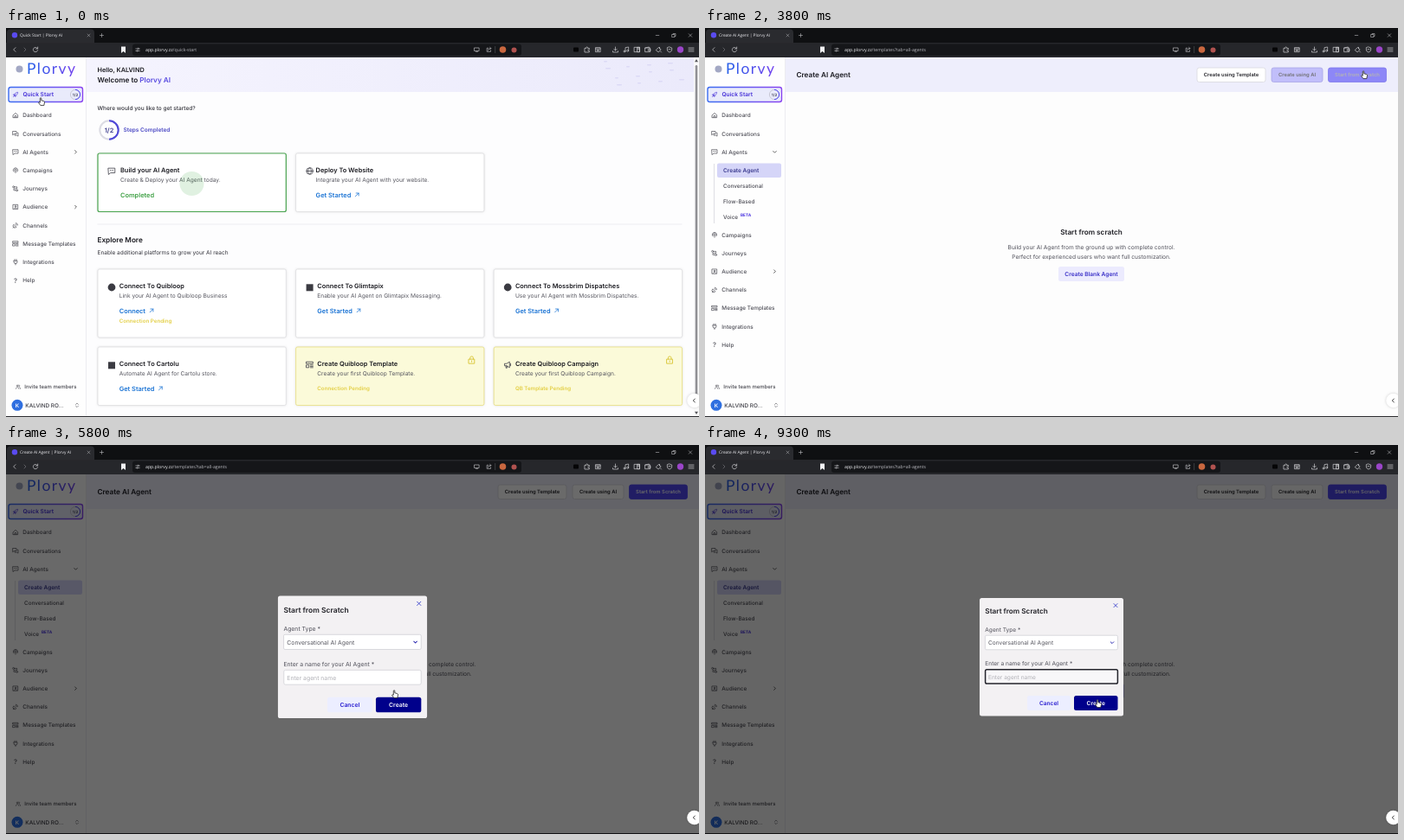
These frames come from a looping animation (800 px wide and 450 px high, 9400 ms). An HTML page with a canvas:

```html
<!DOCTYPE html>
<html lang="en">
<head>
<meta charset="utf-8">
<title>Plorvy AI</title>
<style>
html, body { margin: 0; width: 100%; height: 100%; overflow: hidden; background: #fff; }
canvas { display: block; width: 800px; height: 450px; }
</style>
</head>
<body>
<canvas id="stage" width="800" height="450"></canvas>
<script>
const ctx = document.getElementById('stage').getContext('2d');
const LOOP = 9400, STEP = 100;
const OPEN_MENU = 1300, OPEN_PAGE = 2300, PICK_SCRATCH = 3735, OPEN_MODAL = 5577, FOCUS = 6450;
const INK = '#1c1c22', GREY = '#50505a', BLUE = '#1a73d4', ACCENT = '#4f46f2', NAVY = '#00008b';

const ICONS = {
  rocket: 'M4 20l4-4M9 15c0-7 5-11 11-11 0 6-4 11-11 11zM9 15l-5-2 4-4M9 15l2 5 4-4',
  home: 'M4 11l8-7 8 7v9H4zM9 20v-6h6v6',
  chats: 'M3 4h12v9H7l-4 3zM18 9h3v12l-4-3H9v-2',
  bot: 'M3 4h18v13H9l-5 4zM8 10h2M14 10h2',
  cast: 'M6 17a8 8 0 1 1 12 0M9 14a4 4 0 1 1 6 0M12 12v9',
  route: 'M8 6a3 3 0 1 1-6 0 3 3 0 1 1 6 0M8 6h9v6H6v6h8M20 18a3 3 0 1 1-6 0 3 3 0 1 1 6 0',
  person: 'M4 4h16v16H4zM8 17c1-4 7-4 8 0M14.5 10a2.5 2.5 0 1 1-5 0 2.5 2.5 0 1 1 5 0',
  dish: 'M5 10a6 6 0 0 0 9 9zM4 21l4-4M13 4a8 8 0 0 1 7 7M12 8a5 5 0 0 1 4 4',
  grid: 'M3 4h18v5H3zM3 13h7v7H3zM14 13h7M14 16.5h7M14 20h7',
  plug: 'M9 3v5M15 3v5M6 8h12v4a6 6 0 0 1-12 0zM12 18v4',
  people: 'M12 8a3 3 0 1 1-6 0 3 3 0 1 1 6 0M3 20c0-8 12-8 12 0M15 5a3 3 0 0 1 0 6M17 14c3 0 4 3 4 6',
  globe: 'M21 12a9 9 0 1 1-18 0 9 9 0 1 1 18 0M3 12h18M12 3c-6 6-6 12 0 18c6-6 6-12 0-18',
  horn: 'M4 9h5l8-5v16l-8-5H4zM7 15v6h3v-5M20 9v6',
  lock: 'M5 10h14v11H5zM8 10V7a4 4 0 0 1 8 0v3M12 14v3',
  right: 'M9 6l6 6-6 6', down: 'M6 9l6 6 6-6', left: 'M15 5l-7 7 7 7',
  sort: 'M7 9l5-5 5 5M7 15l5 5 5-5',
  out: 'M5 19L19 5M8 5h11v11',
  close: 'M5 5l14 14M19 5L5 19', plus: 'M12 4v16M4 12h16', minus: 'M5 12h14',
  restore: 'M4 8h12v12H4zM8 8V4h12v12h-4',
  reload: 'M19 8a8 8 0 1 0 1 6M20 3v6h-6',
  tune: 'M3 7h8M17 7h4M3 17h4M13 17h8M17 7a3 3 0 1 1-6 0 3 3 0 1 1 6 0M13 17a3 3 0 1 1-6 0 3 3 0 1 1 6 0',
  screen: 'M3 5h18v12H3zM8 20h8',
  share: 'M9 6H4v14h15v-5M9 15c0-6 4-8 11-8M16 3l4 4-4 4',
  puzzle: 'M4 7h5c-2-6 6-6 4 0h6v5c-6-2-6 6 0 4v5H4z',
  clip: 'M4 5h16v15H4zM4 9h16M9 13h6v3H9z',
  load: 'M12 3v12M7 10l5 5 5-5M3 17v4h18v-4',
  music: 'M9 18V5l11-2v13M9 18a3 3 0 1 1-6 0 3 3 0 1 1 6 0M20 16a3 3 0 1 1-6 0 3 3 0 1 1 6 0',
  panel: 'M3 4h18v16H3zM13 4h8v16h-8zM15 8h4M15 12h4',
  wallet: 'M3 6h17v14H3zM14 11h7v5h-7zM3 6l13-3v3',
  pen: 'M3 13l9-9 8 8-8 8zM15 4v5M18 18l3 3',
  shield: 'M12 3l8 3v6c0 5-4 8-8 9-4-1-8-4-8-9V6zM9 11h6',
  menu: 'M3 6h18M3 12h18M3 18h18'
};

const clamp = v => Math.max(0, Math.min(1, v));
const ramp = (t, start, length) => clamp((t - start) / length);
const smooth = p => p * p * (3 - 2 * p);
const rgb = hex => [1, 3, 5].map(i => parseInt(hex.slice(i, i + 2), 16));
const mix = (a, b, p) => { const q = rgb(b); return `rgb(${rgb(a).map((v, i) => Math.round(v + (q[i] - v) * p))})`; };

function text(str, x, y, size, color = GREY, weight = 400, align = 'left', family = 'Inter, sans-serif') {
  ctx.font = `${weight} ${size}px ${family}`;
  ctx.textAlign = align;
  ctx.fillStyle = color;
  ctx.fillText(str, x, y + size * 0.36);
  return ctx.measureText(str).width;
}
function rect(x, y, w, h, color) { ctx.fillStyle = color; ctx.fillRect(x, y, w, h); }
function box(x, y, w, h, r, fill, stroke, line = 0.8) {
  ctx.beginPath();
  ctx.roundRect(x, y, w, h, r);
  if (fill) { ctx.fillStyle = fill; ctx.fill(); }
  if (stroke) { ctx.strokeStyle = stroke; ctx.lineWidth = line; ctx.stroke(); }
}
function disc(x, y, r, color) {
  ctx.beginPath(); ctx.arc(x, y, r, 0, 7); ctx.fillStyle = color; ctx.fill();
}
function arc(x, y, r, from, to, color, line) {
  ctx.beginPath(); ctx.arc(x, y, r, from, to);
  ctx.strokeStyle = color; ctx.lineWidth = line; ctx.stroke();
}
function shadow(blur, draw) {
  ctx.save();
  ctx.shadowColor = 'rgba(0,0,0,.2)';
  ctx.shadowBlur = blur;
  draw();
  ctx.restore();
}
function icon(name, x, y, size = 8, color = '#45454e', line = 2) {
  ctx.save();
  ctx.translate(x - size / 2, y - size / 2);
  ctx.scale(size / 24, size / 24);
  ctx.strokeStyle = color;
  ctx.lineWidth = line;
  ctx.lineCap = ctx.lineJoin = 'round';
  ctx.stroke(new Path2D(ICONS[name]));
  ctx.restore();
}

function browser(created) {
  const ui = '"Open Sans", sans-serif', pale = '#d6d6da';
  rect(0, 0, 800, 34, '#26272b');
  rect(0, 0, 800, 17, '#0f1012');
  box(1, 1.5, 101, 16, [4, 4, 0, 0], '#2a2b2f');
  disc(10, 8.3, 3.2, '#5a4bf0');
  text((created ? 'Create AI Agent' : 'Quick Start') + ' | Plorvy AI', 16, 8.5, 4.8, '#ececf0', 400, 'left', ui);
  icon('close', 95.5, 8.5, 5, pale);
  icon('plus', 110.5, 8.5, 6, pale);
  icon('minus', 752, 8.5, 6, pale);
  icon('restore', 771, 8.5, 6, pale);
  icon('close', 790, 8.5, 6, pale);
  icon('left', 10, 25, 8, pale);
  icon('right', 22, 25, 8, '#77777d');
  icon('reload', 34, 25, 8, pale);
  ctx.fillStyle = '#f2f2f4';
  ctx.fill(new Path2D('M133 21.5h5v7.5l-2.5-2-2.5 2z'));
  box(146, 18.5, 449, 13.5, 3, '#151619');
  icon('tune', 152, 25.2, 6, pale);
  const host = text('app.plorvy.zz', 161, 25.2, 5.2, '#f0f0f3', 400, 'left', ui);
  text(created ? '/templates?tab=all-agents' : '/quick-start', 161 + host, 25.2, 5.2, '#b9b9bf', 400, 'left', ui);
  icon('screen', 543.5, 25, 7, pale);
  icon('share', 557.5, 25, 7, pale);
  rect(564.5, 21, 0.6, 8, '#55565b');
  disc(573.5, 25, 3.8, '#c9673f');
  disc(586.5, 25.5, 3, '#b0524f');
  box(655, 22.5, 6, 5, 1, '#050506');
  ['puzzle', 'clip'].forEach((n, i) => icon(n, 671 + i * 12.5, 25, 8, pale));
  ['load', 'music', 'panel', 'wallet', 'pen', 'shield'].forEach((n, i) => icon(n, 703.5 + i * 12.5, 25, 8, pale));
  disc(778.5, 25, 3.7, '#9a45c8');
  icon('menu', 791, 25, 8, pale);
}

function sidebar(t, created) {
  rect(0, 34, 92, 416, '#fefefe');
  rect(92, 34, 1, 416, '#ececf1');
  disc(15.5, 47.5, 4, '#a3a8c4');
  const tint = ctx.createLinearGradient(24, 0, 82, 0);
  tint.addColorStop(0, '#2460e8');
  tint.addColorStop(1, '#7440ee');
  ctx.letterSpacing = '1.4px';
  text('Plorvy', 24, 47, 17.5, tint, 400, 'left', 'Lato, sans-serif');
  ctx.letterSpacing = '0px';

  const edge = ctx.createLinearGradient(2, 0, 89, 0);
  edge.addColorStop(0, '#3a6cf0');
  edge.addColorStop(1, '#8a45f0');
  box(3, 68.5, 85.5, 17, 2.5, '#e9ebfb', edge, 1.4);
  icon('rocket', 11, 77, 8, '#4a35d8');
  text('Quick Start', 19.5, 76.8, 6.6, '#4630d8', 600);
  arc(80, 77, 5.6, 0, 7, '#c9c9d6', 1);
  arc(80, 77, 5.6, -Math.PI / 2, Math.PI / 2, ACCENT, 1);
  text('1/2', 80, 77, 4.4, '#3a3a50', 600, 'center');

  const open = smooth(ramp(t, OPEN_MENU, 300)), shift = 74.6 * open;
  const items = [['home', 'Dashboard'], ['chats', 'Conversations'], ['bot', 'AI Agents'], ['cast', 'Campaigns'],
    ['route', 'Journeys'], ['person', 'Audience'], ['dish', 'Channels'], ['grid', 'Message Templates'],
    ['plug', 'Integrations'], ['', 'Help']];
  items.forEach(([glyph, label], i) => {
    const y = 101 + i * 21.2 + (i > 2 ? shift : 0);
    glyph ? icon(glyph, 11, y) : text('?', 11, y, 7.5, '#45454e', 500, 'center');
    text(label, 19.3, y, 6.4, '#4c4c55', 500);
    if (label === 'AI Agents') icon(open > 0.5 ? 'down' : 'right', 80.5, y, 7, '#333', 2.6);
    if (label === 'Audience') icon('right', 80.5, y, 7, '#333', 2.6);
  });

  if (open > 0) {
    ctx.save();
    ctx.beginPath(); ctx.rect(0, 152, 92, shift); ctx.clip();
    rect(10.3, 157, 0.8, 69, '#d5d5dc');
    if (created) box(14, 156.5, 74, 16.5, 2, '#d5d5f8');
    text('Create Agent', 21, 164.7, 6.5, created ? '#3d3d90' : '#4c4c55', created ? 600 : 500);
    ['Conversational', 'Flow-Based', 'Voice'].forEach((s, i) => text(s, 21, 182.5 + i * 17.9, 6.4, '#4c4c55', 500));
    text('BETA', 41, 216.2, 4.7, '#4b35e0', 700);
    ctx.restore();
  }
  icon('people', 14, 415, 7);
  text('Invite team members', 21.3, 415, 6, '#44444c', 500);
  disc(13, 436.3, 6.5, '#2f6fe0');
  text('K', 13, 436.3, 6.2, '#fff', 600, 'center');
  text('KALVIND RO...', 22.3, 436.3, 6.4, '#3c3c44', 500);
  icon('sort', 82, 436.3, 7);
}

function card(x, y, h, c) {
  const locked = c.state === 'locked', done = c.state === 'done';
  const top = y + (c.top || 19.5), left = x + (c.inset || 24.7);
  const border = locked ? '#ebe38c' : done ? '#4aa550' : '#e2e2e5';
  shadow(2.5, () => box(x, y, 217.3, h, 2, locked ? '#fbfad9' : '#fff'));
  box(x, y, 217.3, h, 2, null, border, done ? 1.2 : 0.9);
  if (c.mark === 'disc') disc(x + 16, top + 1.5, 4.4, '#3b3b42');
  else if (c.mark === 'square') rect(x + 12, top - 2.2, 8, 8, '#3b3b42');
  else icon(c.mark, x + 16, top + 1, 10);
  text(c.title, left, top, 7.4, INK, 600);
  text(c.note, left, top + 11.2, 6.6, '#55555e');
  const linkY = top + 28.4;
  if (locked) {
    text(c.pending, left, linkY, 6.2, '#e3cf45', 600);
    icon('lock', x + 203, y + 15, 11, '#d8c535');
    return;
  }
  const w = text(c.link, left, linkY, 7.4, done ? '#3fa045' : BLUE, 600);
  if (!done) icon('out', left + w + 7, linkY, 6.5, BLUE, 2.8);
  if (c.pending) text(c.pending, left, top + 40.4, 6.2, '#e3cf45', 600);
}

function quickStart(t) {
  rect(93, 34, 707, 416, '#fdfdfe');
  const wash = ctx.createLinearGradient(93, 0, 794, 0);
  wash.addColorStop(0, '#f5f4fe');
  wash.addColorStop(1, '#ebeafb');
  rect(93, 34, 701, 40, wash);
  for (let i = 0; i < 13; i++)
    box(690 + (i * 37) % 98, 38 + (i * 17) % 32, 4 + i % 3, 1.6, 0.8, '#dcdaf6');
  text('Hello, KALVIND', 105.5, 48.2, 7.3, INK, 600);
  const w = text('Welcome to ', 105.5, 60, 8.2, INK, 600);
  text('Plorvy AI', 105.5 + w, 60, 8.2, '#584be0', 600);
  text('Where would you like to get started?', 105.5, 93, 6.5, '#33333b', 500);
  arc(119, 118, 10.7, 0, 7, '#dcdce4', 2);
  arc(119, 118, 10.7, -Math.PI / 2, Math.PI / 2, '#4f48d8', 2);
  text('1/2', 119, 118, 7.4, '#3b3a8c', 600, 'center');
  text('Steps Completed', 135.5, 118, 6.5, '#4a48c4', 600);

  const col = i => 106 + i * 228.6;
  card(col(0), 145, 67.5, { state: 'done', mark: 'bot', inset: 26, title: 'Build your AI Agent', note: 'Create & Deploy your AI Agent today.', link: 'Completed' });
  card(col(1), 145, 67.5, { mark: 'globe', inset: 23, title: 'Deploy To Website', note: 'Integrate your AI Agent with your website.', link: 'Get Started' });
  const fade = 1 - ramp(t, 0, 500);
  if (fade > 0) disc(214.5, 180, 14, `rgba(70,170,80,${0.17 * fade})`);

  rect(105.5, 226.6, 675, 0.8, '#e9e9ed');
  text('Explore More', 105.5, 245.5, 8.2, INK, 600);
  text('Enable additional platforms to grow your AI reach', 105.5, 260, 6.5, '#33333b');
  card(col(0), 279, 79, { mark: 'disc', title: 'Connect To Quibloop', note: 'Link your AI Agent to Quibloop Business', link: 'Connect', pending: 'Connection Pending' });
  card(col(1), 279, 79, { mark: 'square', title: 'Connect To Glimtapix', note: 'Enable your AI Agent on Glimtapix Messaging.', link: 'Get Started' });
  card(col(2), 279, 79, { mark: 'disc', title: 'Connect To Mossbrim Dispatches', note: 'Use your AI Agent with Mossbrim Dispatches.', link: 'Get Started' });
  card(col(0), 369, 67.5, { mark: 'square', title: 'Connect To Cartolu', note: 'Automate AI Agent for Cartolu store.', link: 'Get Started' });
  card(col(1), 369, 67.5, { state: 'locked', mark: 'grid', title: 'Create Quibloop Template', note: 'Create your first Quibloop Template.', pending: 'Connection Pending' });
  card(col(2), 369, 67.5, { state: 'locked', mark: 'horn', title: 'Create Quibloop Campaign', note: 'Create your first Quibloop Campaign.', pending: 'QB Template Pending' });

  rect(794, 34, 6, 416, '#fafafa');
  box(795.7, 43, 2.6, 394, 1.3, '#8f8f94');
  ctx.fillStyle = '#55555a';
  ctx.fill(new Path2D('M797 36l2 3.2h-4zM797 447l2-3.2h-4z'));
}

function tabButton(x, w, label, on) {
  box(x, 46, w, 16.5, 2.5, mix('#ffffff', ACCENT, on), mix('#d9d9df', ACCENT, on));
  text(label, x + w / 2, 54.3, 5.85, mix('#26262c', '#ffffff', on), 600, 'center');
}

function createPage(t) {
  rect(93, 34, 707, 416, '#fdfdfd');
  rect(93, 34, 707, 40, '#eeeefc');
  text('Create AI Agent', 105.5, 54.2, 8.2, INK, 600);
  const picked = ramp(t, PICK_SCRATCH, 100);
  tabButton(568, 79, 'Create using Template', 0);
  tabButton(654, 59, 'Create using AI', t < 3000 ? ramp(t, 2600, 100) : 1 - picked);
  tabButton(719.5, 67, 'Start from Scratch', picked);
  if (t < 3700) {
    const turn = (t - 2800) / 1000 * Math.PI * 2 - 1.4;
    arc(446, 238.3, 4.6, turn, turn + 4.9, '#5a50d8', 1.2);
    return;
  }
  text('Start from scratch', 446, 236.5, 8.2, INK, 600, 'center');
  text('Build your AI Agent from the ground up with complete control.', 446, 254, 6.6, GREY, 400, 'center');
  text('Perfect for experienced users who want full customization.', 446, 264.2, 6.6, GREY, 400, 'center');
  const hover = ramp(t, 4700, 150);
  box(408, 276, 76, 17, 2.5, mix('#ecebfe', '#c8caf8', hover));
  text('Create Blank Agent', 446, 284.5, 6.6, mix('#3a30c8', '#1c1a8c', hover), 600, 'center');
}

function modal(t) {
  const u = ramp(t, OPEN_MODAL, 334) - 1;
  const scale = 1 + 2 * u ** 3 + u * u;
  const focused = t >= FOCUS, hover = t < 6050 || t >= 8800;
  ctx.save();
  ctx.translate(400, 245);
  ctx.scale(scale, scale);
  ctx.translate(-400, -245);
  box(317, 177, 166, 136.5, 2.5, '#f3f1f3');
  text('Start from Scratch', 323.3, 192.4, 8.2, '#202026', 600);
  icon('close', 474, 185.6, 7, '#3038c8', 2.8);
  text('Agent Type *', 323.3, 213.4, 6.6, GREY);
  box(323.4, 220.2, 153, 16.6, 1.5, '#fff', '#d2d2d8');
  text('Conversational AI Agent', 327, 228.8, 6.6, '#55555e');
  icon('down', 470, 228.7, 7, '#2a28b0', 3.4);
  text('Enter a name for your AI Agent *', 323.3, 252.8, 6.6, GREY);
  box(323.6, 259.8, 152.8, 16.2, 1.8, focused ? '#f8f7f9' : '#fff', focused ? '#24242c' : '#d2d2d8', focused ? 1.5 : 0.8);
  text('Enter agent name', 327, 268.2, 6.6, '#b0b0b6');
  if (focused && (t - FOCUS) % 1060 < 530) rect(326.4, 263.8, 0.8, 8.2, '#222');
  box(372, 290, 50, 17, 2.5, '#eceeff');
  text('Cancel', 397, 298.4, 6.6, '#2a1fd0', 600, 'center');
  box(426, 290, 50.5, 17, 2.5, hover ? NAVY : '#5249fb');
  text('Create', 451.2, 298.4, 6.6, '#fff', 600, 'center');
  ctx.restore();
}

const PATH = [[0, 41, 85], [400, 41, 85], [1100, 72, 146], [1600, 70, 147], [2050, 48, 168], [2300, 48, 168],
  [2800, 711, 56], [3100, 716, 55], [3600, 761, 54], [4100, 761, 54], [4900, 449, 288], [5900, 449, 288],
  [6400, 388, 265], [8400, 388, 265], [9000, 454, 299], [9400, 454, 299]];

function cursor(t) {
  const i = PATH.findIndex((p, n) => t < PATH[n + 1][0]);
  const [t0, x0, y0] = PATH[i], [t1, x1, y1] = PATH[i + 1];
  const p = smooth((t - t0) / (t1 - t0));
  const within = (a, b) => t >= a && t < b;
  ctx.save();
  ctx.translate(x0 + (x1 - x0) * p, y0 + (y1 - y0) * p);
  ctx.lineJoin = 'round';
  ctx.lineWidth = 0.8;
  ctx.strokeStyle = '#222';
  ctx.fillStyle = '#fff';
  let shape = 'M-1.7-3.8q.8-1.2 1.5 0v2.6l2.7.7q1.2.4 1 1.7l-.7 3.4h-3.9l-2.4-3.2q.2-1.2 1.8-.2z';
  if (within(6300, 8700)) shape = 'M-1.4-3.2h2.8M0-3.2v6.4M-1.4 3.2h2.8';
  else if (within(2400, 2700) || within(4300, 4800) || within(6000, 6300))
    shape = 'M-2-4v8l1.9-1.7 1.2 2.7 1.2-.6-1.2-2.5h2.5z';
  const path = new Path2D(shape);
  ctx.fill(path);
  ctx.stroke(path);
  ctx.restore();
}

function draw(now) {
  const t = Math.floor((now % LOOP) / STEP) * STEP;
  const created = t >= OPEN_PAGE;
  ctx.textRendering = 'geometricPrecision';
  created ? createPage(t) : quickStart(t);
  sidebar(t, created);
  rect(0, 449, 800, 1, '#2a2a2e');
  if (t >= OPEN_MODAL) {
    const dim = 0.6 * (1 - (1 - ramp(t, 5568, 334)) ** 3);
    rect(0, 34, 800, 416, `rgba(0,0,0,${dim})`);
    modal(t);
  }
  browser(created);
  shadow(3, () => disc(794.5, 431, 8.3, '#fff'));
  icon('left', 794.5, 431, 7, '#222', 3);
  cursor(t);
}

let start;
function tick(now) {
  start ??= now;
  draw(now - start);
  requestAnimationFrame(tick);
}
requestAnimationFrame(tick);
</script>
</body>
</html>
```
